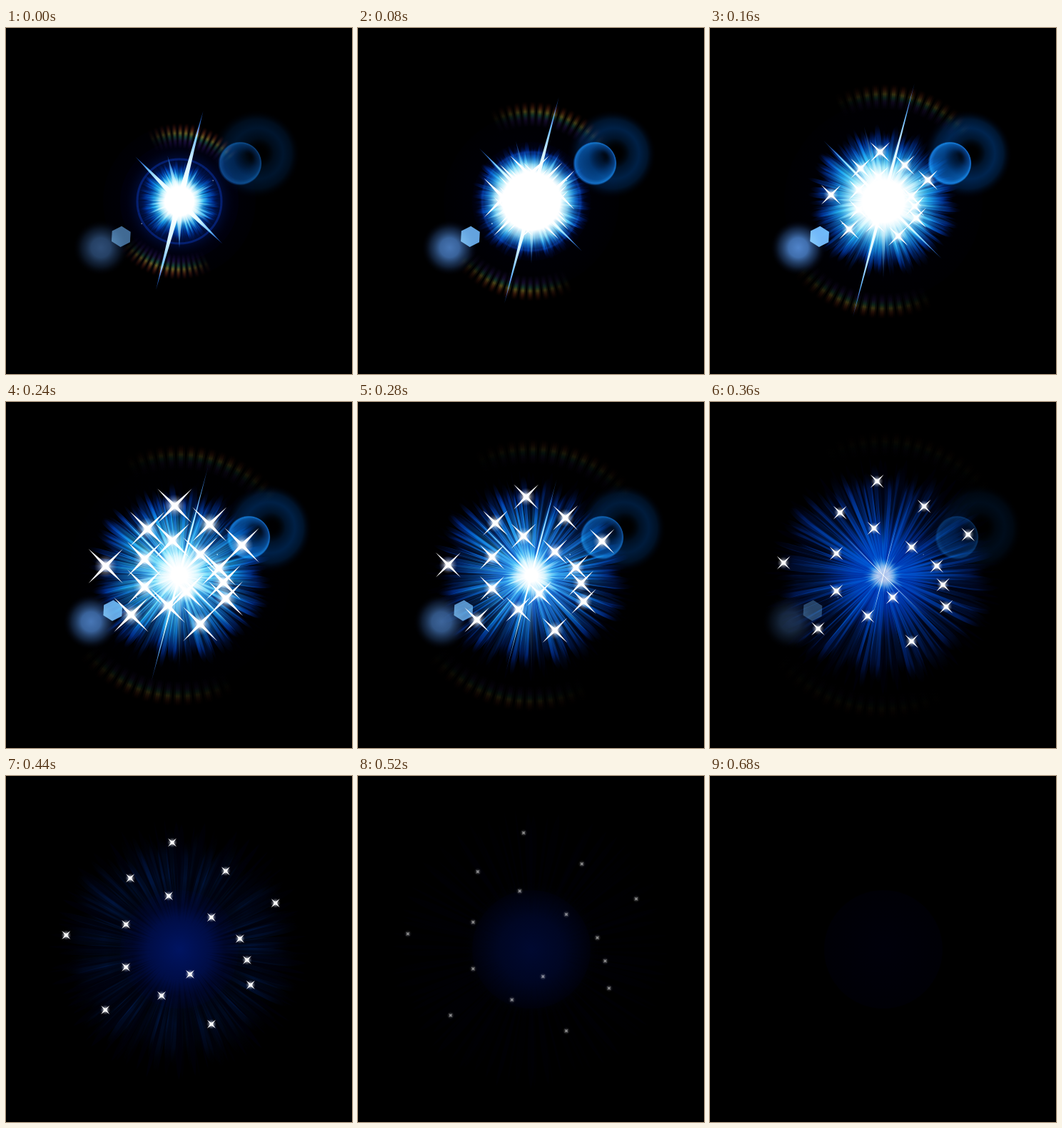
Write an HTML page with a canvas that moves like this. It is 485x485 px and loops after 1.26 s.

```html
<!DOCTYPE html>
<html lang="en">
<head>
<meta charset="utf-8">
<title>Star burst</title>
<style>
html, body { margin: 0; width: 100%; height: 100%; overflow: hidden; background: #000; }
canvas { display: block; width: 100vw; height: 100vh; }
</style>
</head>
<body>
<canvas id="stage" width="485" height="485"></canvas>
<script>
const ctx = document.getElementById('stage').getContext('2d');
const C = 243, LOOP = 1260, STEP = 40, LAST = 680, RAD = Math.PI / 180;

// end places of the small stars, from the centre
const STARS = [
  [-10, -150], [65, -110], [-69, -100], [-15, -75], [135, -65], [45, -45],
  [-75, -35], [-159, -20], [85, -15], [95, 15], [-75, 25], [15, 35],
  [100, 50], [-25, 65], [-104, 85], [45, 105]
];

const clamp = x => Math.max(0, Math.min(1, x));
const bump = (u, peak, width) => Math.exp(-(((u - peak) / width) ** 2));
const rgba = (r, g, b, a = 1) => `rgba(${[r, g, b].map(Math.round).join()},${a})`;

let seed = 17;
const rnd = () => (seed = (seed * 16807) % 2147483647) / 2147483647;
const makeRays = (n, low, thin, wide) => Array.from({ length: n }, (_, i) => ({
  a: (i + rnd() * .9) / n * Math.PI * 2,
  len: low + rnd() * (1 - low),
  w: thin + rnd() * (wide - thin),
  o: .35 + rnd() * .5
}));
const fan = makeRays(130, .84, .014, .045);
const gaps = makeRays(84, .9, .006, .026);
const spikes = makeRays(90, .5, .014, .04);

function stops(g, list) {
  list.forEach(([p, color]) => g.addColorStop(p, color));
  return g;
}

function disc(x, y, r, list, fx = x, fy = y, fr = 0) {
  ctx.fillStyle = stops(ctx.createRadialGradient(fx, fy, fr, x, y, r), list);
  ctx.beginPath();
  ctx.arc(x, y, r, 0, Math.PI * 2);
  ctx.fill();
}

function turned(angle, draw) {
  ctx.save();
  ctx.translate(C, C);
  ctx.rotate(angle);
  draw();
  ctx.restore();
}

// all rays share one unit gradient; belly says where a ray is widest
function burst(rays, R, alpha, list, from, belly) {
  if (alpha <= 0) return;
  const paint = stops(ctx.createRadialGradient(0, 0, 0, 0, 0, 1), list);
  for (const ray of rays) turned(ray.a, () => {
    ctx.scale(R * ray.len, R * ray.len);
    ctx.globalAlpha = alpha * ray.o;
    ctx.fillStyle = paint;
    ctx.beginPath();
    ctx.moveTo(from, 0);
    for (const [side, end] of [[1, 1], [-1, from]]) {
      const near = [from + .3, side * ray.w * .5], far = [belly, side * ray.w * 2.2];
      const [p, q] = side > 0 ? [near, far] : [far, near];
      ctx.bezierCurveTo(...p, ...q, end, 0);
    }
    ctx.fill();
  });
}

function needle(deg, len, half, alpha = 1) {
  if (len <= 0 || half <= 0 || alpha <= 0) return;
  turned(deg * RAD, () => {
    ctx.globalAlpha = alpha;
    ctx.fillStyle = stops(ctx.createLinearGradient(0, 0, len, 0), [
      [0, '#fff'], [.45, '#d5f1ff'], [.72, '#68baff'], [1, 'rgba(20,90,235,.6)']
    ]);
    ctx.beginPath();
    ctx.moveTo(0, -half);
    ctx.lineTo(len, 0);
    ctx.lineTo(0, half);
    ctx.fill();
  });
}

function rainbow(r, alpha) {
  if (alpha <= 0) return;
  const paint = stops(ctx.createLinearGradient(r - 18, 0, r + 18, 0), [
    [0, 'rgba(50,20,110,0)'], [.28, 'rgba(60,32,120,.55)'], [.46, 'rgba(35,110,80,.85)'],
    [.6, 'rgba(155,140,45,.95)'], [.76, 'rgba(140,60,25,.65)'], [1, 'rgba(90,10,0,0)']
  ]);
  for (let i = 0; i < 32; i++) {
    const k = i % 16, base = i < 16 ? -113 : 67;
    turned((base + k * 4.75) * RAD, () => {
      ctx.strokeStyle = paint;
      for (const [w, o] of [[8, .35], [4, .5]]) {
        ctx.globalAlpha = alpha * o * Math.sin((k + .7) / 16.4 * Math.PI);
        ctx.lineWidth = w * r / 120;
        ctx.beginPath();
        ctx.moveTo(r - 18, 0);
        ctx.lineTo(r + 18, 0);
        ctx.stroke();
      }
    });
  }
}

function flares(u, alpha) {
  if (alpha <= 0) return;
  ctx.globalAlpha = alpha;
  const far = 350 + u * 5.5, lens = 328 + u * 4, hex = 161.3 - u * 3.85;
  disc(far, 177, 62, [
    [0, rgba(0, 5, 12, 0)], [.25, rgba(0, 20, 44)], [.52, rgba(0, 36, 78)],
    [.76, rgba(0, 22, 48)], [1, rgba(0, 0, 8, 0)]
  ], far + 6, 175, 7);
  disc(lens, 190, 30.5, [
    [0, rgba(0, 8, 20, .1)], [.4, rgba(2, 28, 65)], [.78, rgba(8, 62, 130)],
    [.93, rgba(22, 112, 210)], [1, rgba(10, 70, 150, .25)]
  ], lens + 11, 181, 4);
  disc(133 - u * 4.6, 308, 39, [
    [0, rgba(80, 132, 202)], [.35, rgba(64, 110, 172)],
    [.7, rgba(24, 46, 80, .75)], [1, rgba(0, 0, 10, 0)]
  ]);
  ctx.fillStyle = rgba(112, 182, 248);
  ctx.beginPath();
  for (let i = 0; i < 6; i++) {
    const q = (i * 60 - 87) * RAD;
    ctx.lineTo(hex + Math.cos(q) * 15, 292.4 + Math.sin(q) * 14.6);
  }
  ctx.fill();
  // two slow specks
  ctx.fillStyle = '#bcdcff';
  ctx.fillRect(289.5 + u * 2, 213, 1.5, 1.5);
  ctx.fillRect(189.5 - u * 2.4, 273.5, 1.5, 1.5);
}

function star(x, y, d, alpha) {
  ctx.globalAlpha = alpha;
  disc(x, y, 4 + d * .5, [
    [0, '#fff'], [.25, 'rgba(255,255,255,.9)'], [.5, 'rgba(235,238,245,.4)'],
    [1, 'rgba(150,150,160,0)']
  ]);
  ctx.fillStyle = '#fff';
  ctx.beginPath();
  for (let i = 0; i < 8; i++) {
    const r = i % 2 ? d * Math.SQRT2 : 1 + d * .1, q = i * Math.PI / 4;
    ctx.lineTo(x + Math.cos(q) * r, y + Math.sin(q) * r);
  }
  ctx.fill();
}

function paint(t) {
  const u = t / 80;
  const heat = .9 * clamp(4 - u);
  const late = Math.max(0, u - 2);
  const coreFade = clamp(5 - u);

  ctx.globalAlpha = 1;
  ctx.globalCompositeOperation = 'source-over';
  ctx.fillStyle = '#000';
  ctx.fillRect(0, 0, 485, 485);
  ctx.globalCompositeOperation = 'screen';

  const haze = 16 * clamp(1 - u / 4);
  disc(C, C, 83, [[0, rgba(0, 0, 10)], [1, rgba(0, 0, 6)]]);
  disc(C, C, 107 + 16 * u, [[0, rgba(0, 0, haze)], [1, rgba(0, 0, haze * .2)]]);

  const blue = (140 + 15 * u) * clamp((8.5 - u) / 4.5) ** 2.2;
  const green = blue * (.22 + .15 * heat);
  disc(C, C, 80 + 20 * clamp(u / 3), [
    [0, rgba(0, green, blue)], [.45, rgba(0, green * .65, blue * .7)],
    [.75, rgba(0, green * .2, blue * .25)], [1, rgba(0, 0, 0, 0)]
  ]);

  // blue fan, cut by dark streaks
  const reach = 60 + 29 * u - 1.4 * u * u;
  const fanFade = clamp((6 - u) / 2);
  const inner = clamp(5.5 - u);
  burst(fan, reach, .9 * fanFade, [
    [0, rgba(100 * heat, 50 + 140 * heat, 150 + 105 * heat, inner)],
    [.4, rgba(60 * heat, 48 + 115 * heat, 145 + 105 * heat, inner)],
    [.64, rgba(15 * heat, 44 + 75 * heat, 140 + 90 * heat)],
    [.84, rgba(0, 30 + 22 * heat, 112 + 60 * heat, .8)],
    [1, rgba(0, 10, 70, 0)]
  ], 0, .95);
  ctx.globalCompositeOperation = 'source-over';
  burst(gaps, reach * 1.05, (.3 + .7 * clamp(u - 2.7)) * clamp(7 - u), [
    [0, rgba(0, 0, 12, 0)], [.25, rgba(0, 0, 12, .2)], [.55, rgba(0, 0, 12)], [1, rgba(0, 0, 8)]
  ], .2, .85);
  ctx.globalCompositeOperation = 'screen';

  ctx.globalAlpha = .5 * clamp(1 - u / 2);
  ctx.strokeStyle = '#0a2c9a';
  ctx.lineWidth = 3;
  ctx.beginPath();
  ctx.arc(C, C, 59 + 10 * u, 0, 7);
  ctx.stroke();

  rainbow(92 + 33 * u - 2.8 * u * u, .95 * clamp(1 - u / 5.5) ** 1.5);

  burst(spikes, 30 + 58 * bump(u, 1.7, 1.9), .9 * coreFade, [
    [0, '#fff'], [.5, '#c8ecff'], [.75, '#50b0ff'], [1, 'rgba(0,70,215,.15)']
  ], 0, .45);
  for (const deg of [-104.5, 90]) needle(deg, 66 + 21 * u, 5, .75 * (1 - u / 4));

  if (coreFade > 0) {
    const R = 22 + 62 * bump(u, 1.7, 1.6);
    const w = (8 + 33 * bump(u, 1.2, 1.2)) / R;
    const mix = k => w + (1 - w) * k;
    ctx.globalAlpha = coreFade;
    disc(C, C, R, [
      [0, '#fff'], [w, '#fff'], [mix(.35), 'rgba(165,225,255,.72)'],
      [mix(.65), 'rgba(50,150,245,.3)'], [1, 'rgba(0,60,200,0)']
    ]);
  }

  flares(u, 1 - ((u - 2) / 3.1) ** 2);

  const half = 4.5 * (1 - u / 5);
  const long = 131 + 20 * Math.min(u, 2) - 14 * late ** 2;
  const diag = 88 + 16 * Math.min(u, 2) - 3.5 * late ** 2;
  needle(-75.2, long, half);
  needle(104.8, long * .98, half);
  needle(-134.5, diag, half);
  needle(44.5, diag * .96, half);

  // stars twinkle on the way out, then shrink
  const spread = .2585 * u - .014 * u * u;
  const d = u < 4 ? 23 - 1.6 * u - 6 * Math.cos(Math.PI * u) : 11 - 3.3 * (u - 4);
  const shine = clamp((7 - u) / 1.5);
  if (shine > 0)
    for (const [x, y] of STARS) star(C + x * spread, C + y * spread, d, shine);
}

let shown = -1;
function tick() {
  const ms = performance.now() % LOOP;
  const t = Math.min(LAST, Math.floor(ms / STEP) * STEP);
  if (t !== shown) paint(shown = t);
  requestAnimationFrame(tick);
}
tick();
</script>
</body>
</html>
```
